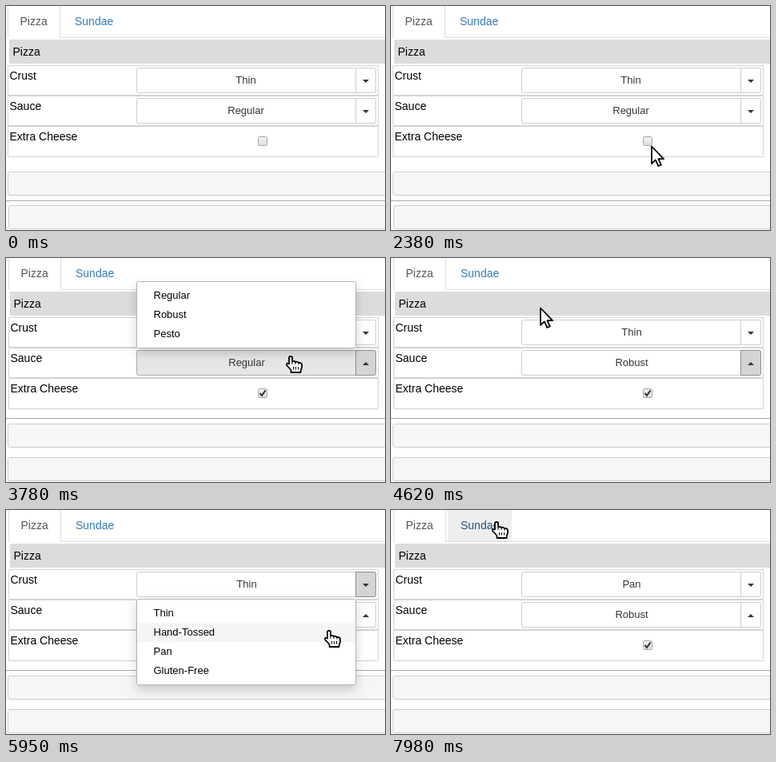
Recreate the animation shown at these times as an HTML page with a canvas. Size 474 by 280 pixels, loop 8 s.

```html
<!DOCTYPE html>
<html lang="en">
<head>
<meta charset="utf-8">
<title>Pizza form</title>
<style>
html, body { margin: 0; width: 100%; height: 100%; overflow: hidden; background: #fff; }
canvas { display: block; width: 474px; height: 280px; }
</style>
</head>
<body>
<canvas id="stage" width="474" height="280"></canvas>
<script>
const ctx = document.getElementById('stage').getContext('2d');
const LOOP = 8000, STEP = 70;
const FONT = '"Liberation Sans", Arial, sans-serif';

const ORIGIN = { x: 242, y: 35 };
const MOVES = [
  { from: 910, to: 1540, x: 113, y: 32 },
  { from: 1750, to: 2380, x: 326, y: 174 },
  { from: 2520, to: 3220, x: 449, y: 136 },
  { from: 3290, to: 3570, x: 453, y: 168 },
  { from: 3570, to: 3780, x: 356, y: 122 },
  { from: 3780, to: 3850, x: 354, y: 111 },
  { from: 3920, to: 4340, x: 187, y: 61 },
  { from: 4900, to: 5110, x: 435, y: 109 },
  { from: 5110, to: 5600, x: 446, y: 95 },
  { from: 5740, to: 6510, x: 377, y: 185 },
  { from: 6720, to: 7000, x: 377, y: 169 },
  { from: 7280, to: 7980, x: 132, y: 14 }
];
const CLICK = { check: 2590, openSauce: 3360, pickSauce: 4620, openCrust: 5740, pickCrust: 7350 };
const MENUS = {
  crust: { y: 111, items: ['Thin', 'Hand-Tossed', 'Pan', 'Gluten-Free'] },
  sauce: { y: 29, items: ['Regular', 'Robust', 'Pesto'] }
};
const ROWS = { crust: 77, sauce: 115 };

const HAND = new Path2D('M-2 10V2.5Q-2 .8 0 .8T2 2.5V7.5Q4 6 6 8Q8 7 10 9Q14 8.5 14 12V15Q12.5 17 12.5 21H.5V18L-5 12Q-5.5 8.5-2 10.5Z');
const KNUCKLES = new Path2D('M2 7.5V11M6 8V11M10 9V11.5M3.5 14V17.5M6.5 14V17.5M9.5 14V17.5');
const ARROW = new Path2D('M0 1.5V23L4.8 18.4L8.4 26L11.8 24.5L8.4 17.2H15Z');

const easeOut = u => 1 - (1 - u) ** 3;

function pointerAt(t) {
  if (t < MOVES[0].from) return null;
  let { x, y } = ORIGIN;
  for (const m of MOVES) {
    if (t < m.from) break;
    const k = easeOut(Math.min(1, (t - m.from) / (m.to - m.from)));
    x += (m.x - x) * k;
    y += (m.y - y) * k;
  }
  return [Math.round(x), Math.round(y)];
}

const menuHeight = name => MENUS[name].items.length * 24 + 12;

function hit(x, y, open) {
  if (open) {
    const { y: top, items } = MENUS[open];
    if (x >= 163 && x < 438 && y >= top && y < top + menuHeight(open)) {
      return 'item' + Math.max(0, Math.min(items.length - 1, Math.floor((y - top - 6) / 24)));
    }
  }
  if (x >= 70 && x < 151 && y < 40) return 'tab';
  for (const name in ROWS) {
    if (x >= 163 && x < 463 && y >= ROWS[name] && y < ROWS[name] + 33) return name + (x < 437 ? 'Button' : 'Toggle');
  }
  return null;
}

function rect(x, y, w, h, color) {
  ctx.fillStyle = color;
  ctx.fillRect(x, y, w, h);
}

function box(x, y, w, h, radius, fill, border) {
  ctx.beginPath();
  ctx.roundRect(x + .5, y + .5, w - 1, h - 1, radius);
  ctx.fillStyle = fill;
  ctx.fill();
  ctx.strokeStyle = border;
  ctx.lineWidth = 1;
  ctx.stroke();
}

function text(str, x, y, size, color, align = 'left') {
  ctx.font = size + 'px ' + FONT;
  ctx.textAlign = align;
  ctx.fillStyle = color;
  ctx.fillText(str, x, y);
}

function drawTabs(dx, hot) {
  rect(2 + dx, 39, 472, 1, '#ddd');
  rect(2 + dx, 39, 65, 1, '#fff');
  rect(2 + dx, 0, 1, 40, '#ddd');
  rect(67 + dx, 0, 1, 40, '#ddd');
  if (hot) rect(70 + dx, 0, 80, 39, '#eee');
  text('Pizza', 17.5 + dx, 24, 14, '#555');
  text('Sundae', 86 + dx, 24, 14, hot ? '#23527c' : '#337ab7');
}

function drawSelect(name, value, dx, hot, pressed, up) {
  const y = ROWS[name];
  const overButton = hot === name + 'Button', overToggle = hot === name + 'Toggle';
  box(163, y, 275, 32, [2, 0, 0, 2], overButton ? '#e6e6e6' : '#fff', overButton ? '#adadad' : '#ccc');
  box(437, y, 26, 32, [0, 2, 2, 0], pressed ? '#d4d4d4' : overToggle ? '#e6e6e6' : '#fff',
    pressed ? '#8c8c8c' : overToggle ? '#adadad' : '#ccc');
  text(value, 300 + dx, y + 20, 13, '#333', 'center');
  const base = y + (up ? 19 : 15), tip = y + (up ? 15 : 19);
  ctx.beginPath();
  ctx.moveTo(446, base);
  ctx.lineTo(454, base);
  ctx.lineTo(450, tip);
  ctx.fillStyle = '#333';
  ctx.fill();
}

function drawCheckbox(checked) {
  const shade = ctx.createLinearGradient(0, 163, 0, 175);
  shade.addColorStop(0, '#f4f4f4');
  shade.addColorStop(1, '#dcdcdc');
  box(315, 163, 12, 12, 2, shade, '#a2a2a2');
  if (!checked) return;
  ctx.beginPath();
  ctx.moveTo(317.5, 169);
  ctx.lineTo(320, 171.8);
  ctx.lineTo(324.6, 165.4);
  ctx.strokeStyle = '#333';
  ctx.lineWidth = 2;
  ctx.stroke();
}

function drawMenu(name, hot) {
  const { y, items } = MENUS[name], h = menuHeight(name);
  ctx.save();
  ctx.shadowColor = 'rgba(0,0,0,.175)';
  ctx.shadowBlur = 12;
  ctx.shadowOffsetY = 6;
  rect(163, y, 275, h, '#fff');
  ctx.restore();
  box(163, y, 275, h, 1, '#fff', '#b4b4b4');
  items.forEach((item, i) => {
    const top = y + 6 + i * 24;
    if (hot === 'item' + i) rect(164, top, 273, 24, '#f5f5f5');
    text(item, 184.5, top + 16, 13, '#000');
  });
}

function drawPointer([x, y], hand) {
  ctx.save();
  ctx.translate(x, y);
  ctx.lineJoin = 'round';
  ctx.fillStyle = '#fff';
  ctx.strokeStyle = '#000';
  ctx.lineWidth = 1.8;
  const shape = hand ? HAND : ARROW;
  ctx.fill(shape);
  ctx.stroke(shape);
  if (hand) {
    ctx.lineWidth = 1;
    ctx.stroke(KNUCKLES);
  }
  ctx.restore();
}

function draw(t) {
  const within = (from, to) => t >= from && t < to;
  const sauceOpen = within(CLICK.openSauce, CLICK.pickSauce);
  const crustOpen = within(CLICK.openCrust, CLICK.pickCrust);
  const open = sauceOpen ? 'sauce' : crustOpen ? 'crust' : null;
  const changed = t >= CLICK.check, dx = changed ? 1 : 0;
  const pos = pointerAt(t);
  const hot = pos && hit(pos[0], pos[1], open);

  rect(0, 0, 474, 280, '#fff');
  drawTabs(dx, hot === 'tab');
  rect(4 + dx, 42, 470, 30, '#dcdcdc');
  text('Pizza', 8.5 + dx, 62, 14, '#000');

  ['Crust', 'Sauce', 'Extra Cheese'].forEach((label, i) => {
    const y = 74 + i * 38;
    box(2 + dx, y, 464 - dx, i === 2 ? 39 : 38, 0, '#fff', '#d3d3d3');
    text(label, 4.5 + dx, y + 18, 14, '#000');
  });
  drawSelect('crust', t < CLICK.pickCrust ? 'Thin' : 'Pan', dx, hot,
    within(CLICK.openCrust, CLICK.pickCrust + STEP), false);
  drawSelect('sauce', t < CLICK.pickSauce ? 'Regular' : 'Robust', dx, hot,
    within(CLICK.openSauce, CLICK.pickSauce + STEP), t >= CLICK.openSauce);
  drawCheckbox(changed);

  box(2, 207, 480, 30, 2, '#f6f6f6', '#ccc');
  box(3 - dx, 249, 480, 30, 2, '#f6f6f6', '#ccc');
  rect(0, changed ? 200 : 243, 474, 1, '#a9a9a9');

  if (open) drawMenu(open, hot);
  // The hand needs the pixel below the tip to be clickable too
  if (pos) drawPointer(pos, hit(pos[0], pos[1] + 1, open) !== null);
}

const start = performance.now();
function frame() {
  const t = (performance.now() - start) % LOOP;
  draw(Math.floor(t / STEP) * STEP);
  requestAnimationFrame(frame);
}
frame();
</script>
</body>
</html>
```
